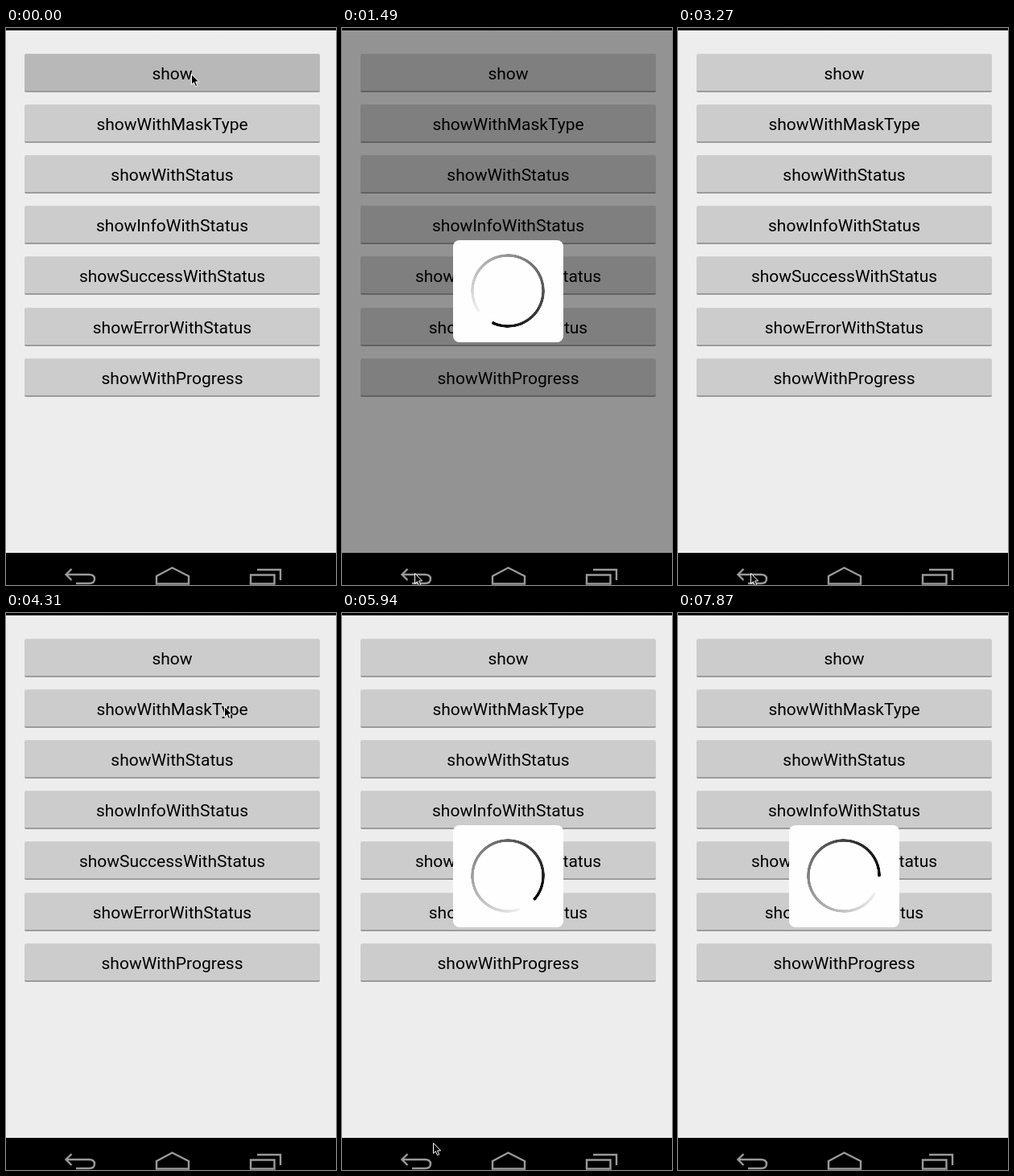
These frames come from a looping animation (410x693 px, 8000 ms). An HTML page:

```html
<!DOCTYPE html>
<html lang="en">
<head>
<meta charset="utf-8">
<title>Progress HUD demo</title>
<style>
  html, body { margin: 0; width: 100%; height: 100%; overflow: hidden; background: #000; }
  #stage { position: relative; width: 410px; height: 693px; overflow: hidden; background: #000; }
  #stage > *, #hud > * { position: absolute; }
  #screen { left: 0; top: 3px; width: 410px; height: 650px; background: linear-gradient(#f2f2f2, #ededed 6px); }
  .button {
    position: absolute; left: 23px; width: 367px; height: 48px; box-sizing: border-box;
    border-radius: 2px; border-top: 1px solid #d3d3d3; border-bottom: 2px solid #9c9c9c;
    background: #ccc; color: #000; text-align: center;
    font: 21px/48px Roboto, sans-serif;
  }
  .button.pressed { background: #b8b8b8; border-top-color: #bcbcbc; }
  #dim { left: 0; top: 3px; width: 410px; height: 650px; background: rgba(0, 0, 0, .38); }
  #hud { left: 138px; top: 264px; width: 137px; height: 127px; border-radius: 8px; background: #fefefe; }
  #spinner { left: 22px; top: 17px; width: 92px; height: 92px; }
  #ring {
    position: absolute; inset: 0; border-radius: 50%;
    background: conic-gradient(transparent 29deg, rgba(0, 0, 0, .06) 31deg, #000 360deg);
    -webkit-mask: radial-gradient(circle, transparent 42px, #000 42.6px, #000 45.6px, transparent 46.2px);
    mask: radial-gradient(circle, transparent 42px, #000 42.6px, #000 45.6px, transparent 46.2px);
  }
  #head { position: absolute; left: 44px; top: 0; width: 4px; height: 4px; border-radius: 50%; background: #000; }
  svg { overflow: visible; }
  #nav { left: 0; top: 0; fill: none; stroke: #999; stroke-width: 2.4; }
  #cursor { left: 0; top: 0; }
</style>
</head>
<body>
<div id="stage">
  <div id="screen"></div>
  <svg id="nav" width="410" height="693">
    <path d="M81.5 673L74.5 680L81.5 687M75 680H103Q110 680 110 685.5T103 691H87"/>
    <path d="M187 691.5V682L206.5 671.5L227 682V691.5Z"/>
    <path d="M304 680.5H333.5V691.5H304ZM312 674H341V687"/>
  </svg>
  <div id="dim"></div>
  <div id="hud"><div id="spinner"><div id="ring"></div><div id="head"></div></div></div>
  <svg id="cursor" width="12" height="18">
    <path d="M.5 .5V13.4L3.4 10.7L5.5 15.6L7.7 14.6L5.6 9.9H9.6Z" fill="#000" stroke="#fff" stroke-width="1"/>
  </svg>
</div>
<script>
const LOOP = 8000, STEP = 148.4;
const $ = id => document.getElementById(id);
const labels = ['show', 'showWithMaskType', 'showWithStatus', 'showInfoWithStatus',
  'showSuccessWithStatus', 'showErrorWithStatus', 'showWithProgress'];

const buttons = labels.map((label, i) => {
  const button = document.createElement('div');
  button.className = 'button';
  button.textContent = label;
  button.style.top = 29 + 63.1 * i + 'px';
  $('screen').append(button);
  return button;
});

// Pointer stops: [step, x, y]
const path = [
  [0, 230, 57], [1, 230, 58], [3, 236, 131], [8, 124, 645], [10, 90, 678],
  [22, 90, 678], [23, 98, 663], [26, 215, 240], [28, 266, 86], [29, 271, 116],
  [31, 271, 116], [32, 268, 135], [39, 144, 602], [40, 113, 659], [42, 100, 679],
  [45, 100, 679], [47, 135, 555]
];

function pointerAt(step) {
  const next = path.findIndex(stop => stop[0] > step);
  if (next < 0) return path[path.length - 1].slice(1);
  const [s0, x0, y0] = path[next - 1], [s1, x1, y1] = path[next];
  const k = (step - s0) / (s1 - s0);
  return [x0 + (x1 - x0) * k, y0 + (y1 - y0) * k];
}

const show = (id, visible) => { $(id).style.display = visible ? 'block' : 'none'; };

function render(time) {
  const step = Math.floor((time % LOOP + 3) / STEP);
  const masked = step >= 1 && step < 20;
  const unmasked = step >= 31;
  const angle = unmasked ? 130.5 + 24.5 * (step - 40) : 32.5 + 24.5 * (step - 3);
  const [x, y] = pointerAt(step);

  buttons[0].classList.toggle('pressed', step === 0);
  buttons[1].classList.toggle('pressed', step === 30);
  show('dim', masked);
  show('hud', masked || unmasked);
  show('cursor', step < 48);
  $('spinner').style.transform = `rotate(${angle}deg)`;
  $('cursor').style.transform = `translate(${Math.round(x)}px, ${Math.round(y)}px)`;
}

const start = performance.now();
function tick() {
  render(performance.now() - start);
  requestAnimationFrame(tick);
}
tick();
</script>
</body>
</html>
```
